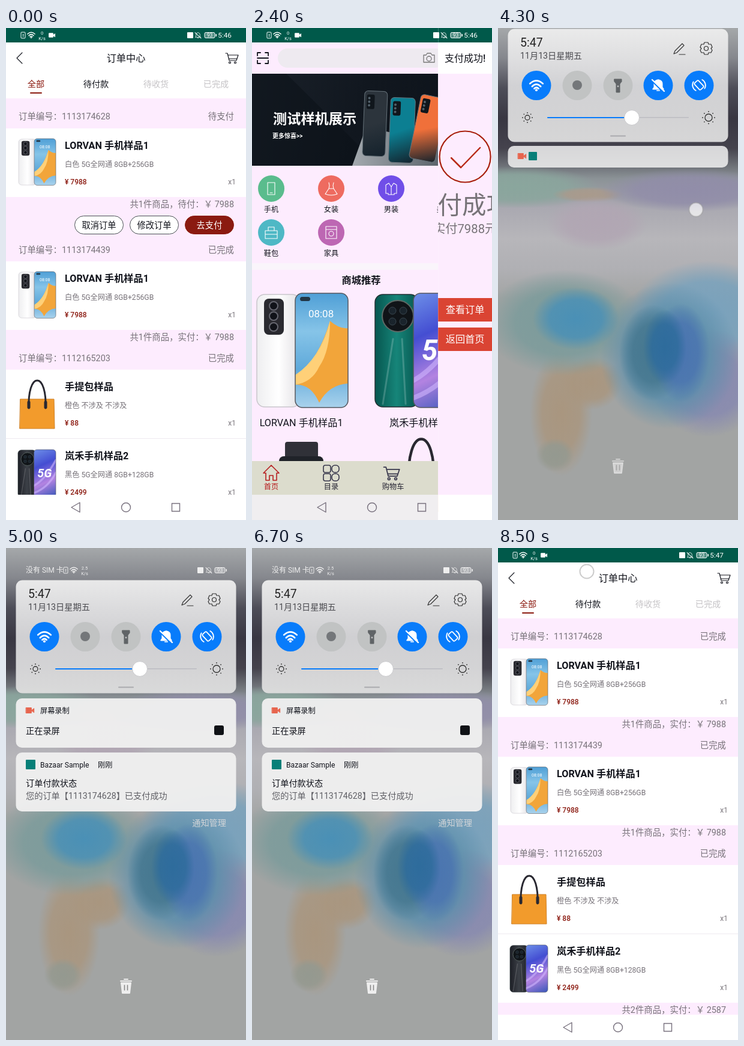
Recreate the animation shown at these times as an HTML page with a canvas. Size 400 by 818 pixels, loop 8600 ms.

```html
<!DOCTYPE html>
<html lang="zh-CN">
<head>
<meta charset="utf-8">
<title>订单中心</title>
<style>
html, body { margin: 0; width: 100%; height: 100%; overflow: hidden; }
canvas { display: block; width: 400px; height: 818px; }
</style>
</head>
<body>
<canvas id="stage"></canvas>
<script>
const W = 400, H = 818, LOOP = 8600, STEP = 100;
const LILAC = '#fdecfe', TEAL = '#00594a', INK = '#12141c', GREY = '#777279', RED = '#8b1a10', BLUE = '#087cfb';
const canvas = document.getElementById('stage');
const g = canvas.getContext('2d');
const ratio = window.devicePixelRatio || 1;
canvas.width = W * ratio;
canvas.height = H * ratio;

// Drawing helpers
const group = (x, y, draw, scale = 1) => {
  g.save(); g.translate(x, y); g.scale(scale, scale); draw(); g.restore();
};
const faded = (alpha, draw) => {
  g.save(); g.globalAlpha *= alpha; draw(); g.restore();
};
const clipped = (x, y, w, h, r, draw) => {
  g.save(); g.beginPath(); g.roundRect(x, y, w, h, r); g.clip(); draw(); g.restore();
};
const paint = (path, fill, stroke, width = 1.5) => {
  if (fill) { g.fillStyle = fill; g.fill(path); }
  if (stroke) { g.strokeStyle = stroke; g.lineWidth = width; g.stroke(path); }
};
const box = (x, y, w, h, r, fill, stroke, width) => {
  const p = new Path2D(); p.roundRect(x, y, w, h, r); paint(p, fill, stroke, width);
};
const disc = (x, y, r, fill, stroke, width) => {
  const p = new Path2D(); p.arc(x, y, r, 0, 7); paint(p, fill, stroke, width);
};
const icon = (d, x, y, stroke, width, fill) => group(x, y, () => {
  g.lineCap = g.lineJoin = 'round';
  paint(new Path2D(d), fill, stroke, width);
});
const text = (s, x, y, size, color = INK, align = 'left', weight = 400) => {
  g.font = `${weight} ${size}px Roboto, "Noto Sans CJK SC", "Noto Sans CJK", sans-serif`;
  g.textAlign = align;
  g.fillStyle = color;
  g.fillText(s, x, y + size * 0.36);
};
const gradient = (x0, y0, x1, y1, ...colors) => {
  const c = g.createLinearGradient(x0, y0, x1, y1);
  colors.forEach((color, i) => c.addColorStop(i / (colors.length - 1), color));
  return c;
};
const progress = (t, start, length) => Math.min(1, Math.max(0, (t - start) / length));
const easeOut = p => 1 - (1 - p) ** 2;
const mix = (a, b, p) => a + (b - a) * p;

// Small icons
const wifi = (x, y, s, color) => group(x, y, () => {
  icon('M-9-3Q0-11 9-3M-6 1Q0-5 6 1M-3 4Q0 1 3 4', 0, 0, color, 2.2);
  disc(0, 6, 1.7, color);
}, s);
const bellOff = (x, y, s, color) => group(x, y, () => {
  icon('M-8 6H8L6 3V-2Q6-7 0-8Q-6-7-6-2V3ZM-2 8H2', 0, 0, color, 1.4, s > 0.8 ? color : null);
  if (s > 0.8) icon('M-10-7L8 11', 0, 0, BLUE, 2);
  icon('M-9-8L9 9', 0, 0, color, 2);
}, s);
const camcorder = (x, y, s, color) => icon(`M${-5*s}-${4*s}H${3*s}V${4*s}H${-5*s}ZM${3*s} 0L${7*s}-${3*s}V${3*s}Z`, x, y, color, 1, color);
const cart = (x, y, color, width = 1.2) => {
  icon('M-10-8H-7L-4 4H8L11-5H-6M-4 1H9', x, y, color, width);
  disc(x - 3, y + 7.5, 1.5, null, color, width);
  disc(x + 6, y + 7.5, 1.5, null, color, width);
};
const backArrow = () => icon('M4-9L-5 0L4 9', 23, 50, INK, 1.1);
const battery = (x, y, color) => {
  box(x, y - 4.5, 17, 9, 2, '#ffffff50', color, 1);
  box(x + 18.5, y - 2, 1.5, 4, 0, color);
  text('93', x + 8.5, y, 8.5, color, 'center');
};
const statusIcons = (x, y, rate, color) => {
  box(x - 3, y - 5, 7, 10, 1, null, color, 1);
  text('!', x + 0.5, y, 8, color, 'center', 700);
  wifi(x + 14, y, 0.68, color);
  text(rate, x + 32, y - 4, 7.5, color, 'center');
  text('K/s', x + 32, y + 5, 7.5, color, 'center');
};

// Product pictures, drawn on a 152 x 190 field
const phones = (x, y, width, back, dark) => group(x, y, () => {
  box(0, 2, 72, 187, 13, gradient(0, 0, 72, 0, ...back), dark ? '#222e32' : '#c9c6cc', 1.5);
  if (dark) {
    disc(38, 38, 26, '#101418', '#5d6a66', 2);
    [[29, 29], [47, 29], [29, 47], [47, 47]].forEach(([cx, cy]) => disc(cx, cy, 6, '#1a242c', '#39464e', 1));
    icon('M30 76L13 184M45 76L51 184', 0, 0, '#ffffff30', 3);
  } else {
    box(12, 9, 33, 60, 8, '#2a2a30');
    [21, 38, 56].forEach(cy => disc(28, cy, 7, '#111319', '#666770', 2));
  }
  clipped(64, 0, 88, 190, 12, () => {
    if (dark) {
      box(64, 0, 88, 190, 0, gradient(64, 0, 152, 190, '#6d8fe8', '#444ed2', '#b383e1', '#3656b8'));
      icon('M64 145Q110 120 152 42M64 174Q122 152 152 92', 0, 0, '#d3b8ff90', 8);
      text('5G', 107, 94, 48, '#fff', 'center', 'italic 700');
    } else {
      box(64, 0, 88, 190, 0, gradient(0, 0, 0, 190, '#4f9fd6', '#86c4e8', '#5fa9da', '#a9d2ec'));
      icon('M64 136Q100 118 122 46Q138 60 152 58V150Q120 152 104 182Q90 150 64 152Z', 0, 0, null, 0, '#f2a53a');
      icon('M122 46Q106 108 64 136V152Q92 148 104 122Q122 96 122 46Z', 0, 0, null, 0, '#ffd078');
      text('08:08', 107, 34, 17, '#fff', 'center');
      box(72, 6, 17, 7, 4, '#223646');
    }
  });
  box(64, 0, 88, 190, 12, null, '#55585f', 1.5);
}, width / 152);
const whitePhones = (x, y, w) => phones(x, y, w, ['#eeeef0', '#ffffff', '#e2e0e4'], false);
const blackPhones = (x, y, w) => phones(x, y, w, ['#1d1f26', '#3c4047', '#202229'], true);
const greenPhones = (x, y, w) => phones(x, y, w, ['#07564f', '#168579', '#07564f'], true);
const bag = (x, y, s = 1) => group(x, y, () => {
  icon('M0 0H56L57 49H-1Z', 0, 0, '#ce8128', 1, '#f29b2c');
  icon('M14 15C13-12 19-31 28-31S43-12 42 15', 0, 0, '#292831', 3);
  [14, 42].forEach(px => box(px - 2.5, 3, 5, 13, 2, '#292831'));
}, s);

// Order list
const product = (y, name, detail, price, picture) => {
  box(0, y, W, 114, 0, '#fff');
  picture(y);
  text(name, 98, y + 28, 16.2, INK, 'left', 700);
  text(detail, 98, y + 60, 12.2, GREY);
  text('¥ ' + price, 98, y + 89, 12, RED, 'left', 500);
  text('x1', 383, y + 89, 12, GREY, 'right');
};
const orderHead = (y, number, state) => {
  text('订单编号：' + number, 21, y, 14.4, GREY);
  text(state, 380, y, 14.4, GREY, 'right');
};
const orderTotal = (y, count, label, sum) =>
  text(`共${count}件商品，${label}：￥ ${sum}`, 380, y, 14.4, GREY, 'right');
const whitePhoneItem = y => product(y, 'LORVAN 手机样品1', '白色 5G全网通 8GB+256GB', 7988, top => whitePhones(21, top + 17, 62));

function orders(paid) {
  box(0, 0, W, H, 0, '#fff');
  box(0, 117, W, 659, 0, LILAC);
  clipped(0, 117, W, 659, 0, () => {
    orderHead(147, 1113174628, paid ? '已完成' : '待支付');
    whitePhoneItem(167);
    orderTotal(293, 1, paid ? '实付' : '待付', 7988);
    if (!paid) {
      [['取消订单', 114], ['修改订单', 206], ['去支付', 298]].forEach(([label, x], i) => {
        box(x + 0.5, 312.5, 81, 30, 15, i < 2 ? '#fff' : RED, i < 2 ? '#4a5054' : RED, 1);
        text(label, x + 41, 327.5, 14.3, i < 2 ? INK : '#fff', 'center');
      });
    }
    group(0, paid ? 0 : 41, () => {
      orderHead(328, 1113174439, '已完成');
      whitePhoneItem(347);
      orderTotal(473, 1, '实付', 7988);
      orderHead(508, 1112165203, '已完成');
      product(527, '手提包样品', '橙色 不涉及 不涉及', 88, top => bag(24, top + 49));
      product(642, '岚禾手机样品2', '黑色 5G全网通 8GB+128GB', 2499, top => blackPhones(20, top + 18, 63));
      box(0, 641, W, 1, 0, '#eeeaf0');
      orderTotal(768, 2, '实付', 2587);
    });
  });
  box(0, 0, W, 24, 0, TEAL);
  backArrow();
  text('订单中心', 200, 50, 16.2, INK, 'center');
  cart(376, 50, INK);
  ['全部', '待付款', '待收货', '已完成'].forEach((tab, i) =>
    text(tab, 50 + 100 * i, 93, 14.2, [RED, INK, '#c5c3c6', '#c5c3c6'][i], 'center', i ? 400 : 500));
  box(40, 107, 20, 2, 1, RED);
}

function success() {
  box(0, 0, W, H, 0, '#fff');
  box(0, 76, W, 700, 0, LILAC);
  box(0, 0, W, 24, 0, TEAL);
  backArrow();
  text('支付成功!', 200, 50, 16, INK, 'center', 500);
  disc(200, 214, 42.5, null, '#a8200d', 2.2);
  icon('M177 216L193 232L225 199', 0, 0, '#b82a18', 2.5);
  text('支付成功!', 200, 294, 40.5, '#777378', 'center');
  text('实付7988元', 200, 334, 20.3, '#777378', 'center');
  [['查看订单', 449], ['返回首页', 498]].forEach(([label, y]) => {
    box(20, y, 360, 39, 19.5, '#da4433');
    text(label, 200, y + 19.5, 16.2, '#fff', 'center');
  });
}

function banner() {
  box(0, 76, W, 153, 0, gradient(0, 76, 400, 180, '#1b222b', '#11171f', '#0d131a'));
  icon('M0 76H75L230 229H0Z', 0, 0, null, 0, '#0b101780');
  icon('M185 229L208 165L400 205V229Z', 0, 0, null, 0, gradient(185, 0, 400, 0, '#a3a9ae', '#39434c'));
  [[225, 105, 38, '#2c343c', 0.04], [270, 116, 41, '#0c7f92', 0.04], [322, 114, 44, '#f0703a', 0.2]]
    .forEach(([x, y, w, color, tilt]) => group(x, y, () => {
      g.rotate(tilt);
      box(-w / 2, 0, w, 108, 6, gradient(-w / 2, 0, w / 2, 108, color, color, '#14222c'), '#66727a', 1);
      box(-w / 2 + 4, 6, 13, 24, 3, '#10161c');
      [12, 18, 24].forEach(cy => disc(-w / 2 + 8, cy, 2, '#52606a'));
    }));
}

function home() {
  box(0, 0, W, H, 0, LILAC);
  box(0, 0, W, 24, 0, TEAL);
  icon('M-9-4V-9H-4M4-9H9V-4M9 4V9H4M-4 9H-9V4M-9 0H9', 36, 50, INK, 1.8);
  box(61, 34, 278, 32, 16, '#eeeaf0');
  icon('M-9-5H-5L-3-8H3L5-5H9V7H-9Z', 313, 50, '#777', 1.3);
  disc(313, 51, 4, null, '#777', 1.3);
  icon('M-9-8H9V5H0L-5 9V5H-9Z', 364, 50, INK, 1.5);

  clipped(0, 76, W, 153, 0, banner);
  text('测试样机展示', 53, 151, 23.2, '#fff', 'left', 700);
  text('更多惊喜>>', 52, 179, 10, '#fff', 'left', 700);

  const categories = [
    ['手机', '#5abc8d', 'M-6-10H6V10H-6ZM-2 7H2'],
    ['女装', '#ee6b60', 'M-4-10L-3-5L-4 0L-10 9Q0 13 10 9L4 0L3-5L4-10M-4 0H4'],
    ['男装', '#704ee8', 'M-4-9L-9-6V8H-5V10H5V8H9V-6L4-9L0-3ZM0-3V10'],
    ['美妆护肤', '#efa34d', 'M-5-2H5V10H-5ZM-3-2V-9L3-6V-2'],
    ['鞋包', '#4eb8c5', 'M-10-3H10V10H-10ZM-5-3V-9H5V-3M-10 3H10'],
    ['家具', '#bd67b3', 'M-9-10H9V10H-9ZM-9-5H9M-4 2A4 4 0 1 0 4 2A4 4 0 1 0-4 2']
  ];
  categories.forEach(([label, color, path], i) => {
    const x = 50 + i % 4 * 100, y = i < 4 ? 267 : 340;
    disc(x, y, 22, color);
    icon(path, x, y, '#fff', 1.1);
    text(label, x, y + 34.5, 12.2, INK, 'center');
  });
  box(0, 391, W, 11, 0, '#faf5fb');
  text('商城推荐', 200, 419, 16.3, INK, 'center', 700);
  whitePhones(26, 441, 152);
  greenPhones(223, 441, 152);
  text('LORVAN 手机样品1', 100, 656, 16.2, INK, 'center');
  text('岚禾手机样品2', 300, 656, 16.2, INK, 'center');
  box(73, 688, 55, 40, 4, '#303138');
  box(63, 712, 74, 35, 8, '#202329');
  bag(258, 730, 1.5);

  box(0, 720, W, 56, 0, '#dcdccd');
  icon('M-13 0L0-13L13 0H9V12H3V4H-3V12H-9V0Z', 50, 740, '#b71f20', 1.6);
  [[-7, -7], [7, -7], [-7, 7], [7, 7]].forEach(([dx, dy]) =>
    box(144 + dx, 734 + dy, 12, 12, [dx > 0 ? 5 : 3], null, '#39384d', 1.6));
  group(250, 740, () => cart(0, 0, '#39384d', 1.4), 1.25);
  disc(350, 734, 6, null, '#39384d', 1.6);
  icon('M-11 12Q-9 3 0 3Q9 3 11 12Z', 350, 740, '#39384d', 1.6);
  ['首页', '目录', '购物车', '我的'].forEach((label, i) =>
    text(label, [50, 150, 253, 350][i], 763, 12.2, i ? '#242331' : '#b71f20', 'center'));
  box(0, 776, W, 42, 0, '#f0eef0');
}

function systemBars(clock) {
  statusIcons(28, 12, '0', '#fff');
  camcorder(76, 12, 0.8, '#fff');
  box(302, 7, 10, 10, 1, '#fff');
  bellOff(320, 12, 0.55, '#fff');
  battery(331, 12, '#fff');
  text(clock, 376, 12, 11.8, '#fff', 'right');
  icon('M-7 0L7-8V8Z', 116, 797, '#77707d', 1.4);
  disc(200, 797, 7.5, null, '#77707d', 1.4);
  box(276.5, 790.5, 13, 13, 0, null, '#77707d', 1.4);
}

// The front page is uncovered from edge while the back page drifts
function slide(back, front, edge) {
  clipped(0, 0, edge, H, 0, () => group(-0.2 * (W - edge), 0, back));
  clipped(edge, 0, W - edge, H, 0, () => group(edge / 2, 0, front));
}

// Notification shade
const blob = (x, y, rx, ry, color) => {
  g.save();
  g.translate(x, y);
  g.scale(rx, ry);
  const c = g.createRadialGradient(0, 0, 0, 0, 0, 1);
  c.addColorStop(0, color);
  c.addColorStop(0.6, color + 'd8');
  c.addColorStop(1, color + '00');
  disc(0, 0, 1, c);
  g.restore();
};
function shadeBackground() {
  box(0, 0, W, H, 0, '#a2a4a3');
  box(0, 0, W, 450, 0, gradient(0, 0, 0, 450,
    '#a5a8aa', '#85878d', '#4d4d58', '#393742', '#45434d', '#8b9296', '#aaa9b1', '#b7b6ba', '#b0b0b4', '#a2a4a3'));
  blob(30, 265, 140, 35, '#8aa69d');
  blob(150, 277, 60, 13, '#a99a8c');
  blob(320, 270, 150, 36, '#918da9');
  blob(165, 325, 85, 45, '#b1a6b3');
  blob(105, 640, 52, 105, '#a9967f');
  blob(155, 590, 52, 45, '#a9967f');
  blob(95, 710, 32, 28, '#949990');
  blob(110, 490, 135, 88, '#7b9b9b');
  blob(350, 475, 130, 88, '#79a2bd');
  blob(350, 590, 95, 90, '#8789b0');
  blob(285, 545, 115, 122, '#5d8fab');
  blob(130, 483, 72, 52, '#4a90b6');
  blob(258, 540, 56, 80, '#45778f');
  blob(305, 540, 48, 82, '#4a74b0');
  blob(278, 530, 36, 62, '#2e6c9c');
}
function quickPanel() {
  text('没有 SIM 卡', 33, 37, 12, '#eee');
  statusIcons(99, 37, '2.5', '#eee');
  box(319, 32, 10, 10, 1, '#eee');
  bellOff(338, 37, 0.55, '#eee');
  battery(348, 37, '#eee');
  box(16.5, 53.5, 367, 188, 11, gradient(0, 53, 0, 241, '#eeeeeef2', '#dddddfea', '#dededef2'));
  text('5:47', 37, 76, 19.5, '#222');
  text('11月13日星期五', 37, 97.5, 14.2, '#4b4b50');
  icon('M-9 8L-7 3L5-9L8-6L-4 6ZM0 9H10', 302, 87, '#333', 1.2);
  icon('M-3-10H3L4-7L8-7L10-2L8 0L10 3L8 7L4 7L3 10H-3L-4 7L-8 7L-10 3L-8 0L-10-2L-8-7L-4-7Z', 347, 86, '#333', 1.2);
  disc(347, 86, 3.5, null, '#333', 1.2);
  [64, 132, 200, 267, 335].forEach((x, i) => {
    const on = i !== 1 && i !== 2;
    disc(x, 147.5, 24.5, on ? BLUE : '#c1c3c3');
  });
  wifi(64, 148, 1.2, '#fff');
  disc(132, 147, 8, '#74777a');
  icon('M-6-11H6V-7L3-3V11H-3V-3L-6-7ZM-6-7H6', 200, 148, '#606467', 1, '#606467');
  disc(200, 149, 1.4, '#c1c3c3');
  bellOff(267, 147, 1.12, '#fff');
  group(335, 147, () => {
    g.rotate(-0.75);
    box(-4.5, -7.5, 9, 15, 2, null, '#fff', 1.8);
    icon('M-10 3A10.5 10.5 0 0 1-3-10.5M10-3A10.5 10.5 0 0 1 3 10.5', 0, 0, '#fff', 1.8);
  });
  box(82, 200, 236, 1.5, 1, '#bcbcc2');
  box(82, 200, 141, 2, 1, BLUE);
  disc(223, 201, 12.5, '#fff', '#c9c9cc', 1);
  [[49, 4], [351, 6]].forEach(([x, r]) => {
    disc(x, 201, r, null, '#333', 1.3);
    for (let i = 0; i < 8; i++) {
      const a = i * Math.PI / 4;
      disc(x + Math.cos(a) * (r + 4), 201 + Math.sin(a) * (r + 4), 0.9, '#333');
    }
  });
  box(187, 230.5, 26, 2, 1, '#aaaaae');
}
function notifications(open) {
  const surface = `rgba(240, 240, 240, ${mix(0.86, 0.96, open)})`;
  box(16.5, mix(248, 250, open), 367, mix(36, 82, open), 10, surface);
  camcorder(39, mix(265, 270, open), 1.1, '#e7654e');
  if (open < 1) box(51, 258, 14, 14, 1, '#087f78');
  faded(open, () => {
    text('屏幕录制', 57, 271, 12.2);
    text('正在录屏', 33, 304, 14.2, INK, 'left', 500);
    box(347, 295, 16, 16, 3, '#101216');
    box(16.5, mix(270, 340, open), 367, 98, 10, surface);
    box(33, mix(258, 352, open), 16, 16, 1, '#087f78');
    text('Bazaar Sample', 57, 361, 12.2);
    text('刚刚', 153, 361, 12.2);
    text('订单付款状态', 33, 391, 14.2, INK, 'left', 500);
    text('您的订单【1113174628】已支付成功', 33, 412, 14.2, '#606066');
    text('通知管理', 367, 457, 14.2, '#d2d5d8', 'right');
  });
}
function shade(t) {
  const open = easeOut(progress(t, 4300, 500));
  const launch = progress(t, 7200, 505), grown = easeOut(launch);
  const pulled = mix(-250, -52, easeOut(progress(t, 3600, 700)));
  const y = mix(pulled, 0, open) - 340 * grown;
  faded(progress(t, 3500, 500), shadeBackground);
  group(0, y, () => { quickPanel(); notifications(open); });
  faded(mix(0.6, 1, open) * progress(t, 3700, 400) * (1 - 0.6 * grown), () => {
    icon('M-9-8H9M-3-11H3M-8-5H8L6 12H-6Z', 200, 728, '#eee', 2, '#eee');
    icon('M-2.5-1V7M2.5-1V7', 200, 728, '#888', 1.6);
  });
  if (launch > 0) {
    const x = mix(16, 0, grown), top = mix(340, 0, grown), bottom = mix(438, H, grown);
    clipped(x, top, W - 2 * x, bottom - top, 9 * (1 - grown), () => {
      box(0, 0, W, H, 0, '#fff');
      faded(Math.min(1, launch / 0.86), () => group(0, top, () => orders(true)));
    });
  }
}

function touch(x, y) {
  disc(x, y, 11.5, '#ffffffb0', '#99999980', 2);
}

function render(t) {
  g.setTransform(ratio, 0, 0, ratio, 0, 0);
  g.clearRect(0, 0, W, H);
  if (t < 700) orders(false);
  else if (t < 2200) slide(() => orders(false), success, W * (1 - easeOut(progress(t, 700, 400))));
  else if (t < 7700) slide(home, success, W * easeOut(progress(t, 2200, 380)));
  else orders(true);
  systemBars(t < 3600 ? '5:46' : '5:47');
  if (t >= 3500 && t < 7700) shade(t);

  if (t >= 500 && t < 700) touch(339, 328);
  if (t >= 2000 && t < 2200) touch(230, 518);
  if (t >= 3500 && t < 4500) touch(330, mix(8, 302, progress(t, 3500, 800)));
  if (t >= 7000 && t < 7200) touch(230, 397);
  if (t >= 8400) touch(148, 39);
}

const start = performance.now();
function frame() {
  const elapsed = (performance.now() - start) % LOOP;
  render(Math.floor(elapsed / STEP) * STEP);
  requestAnimationFrame(frame);
}
frame();
</script>
</body>
</html>
```
